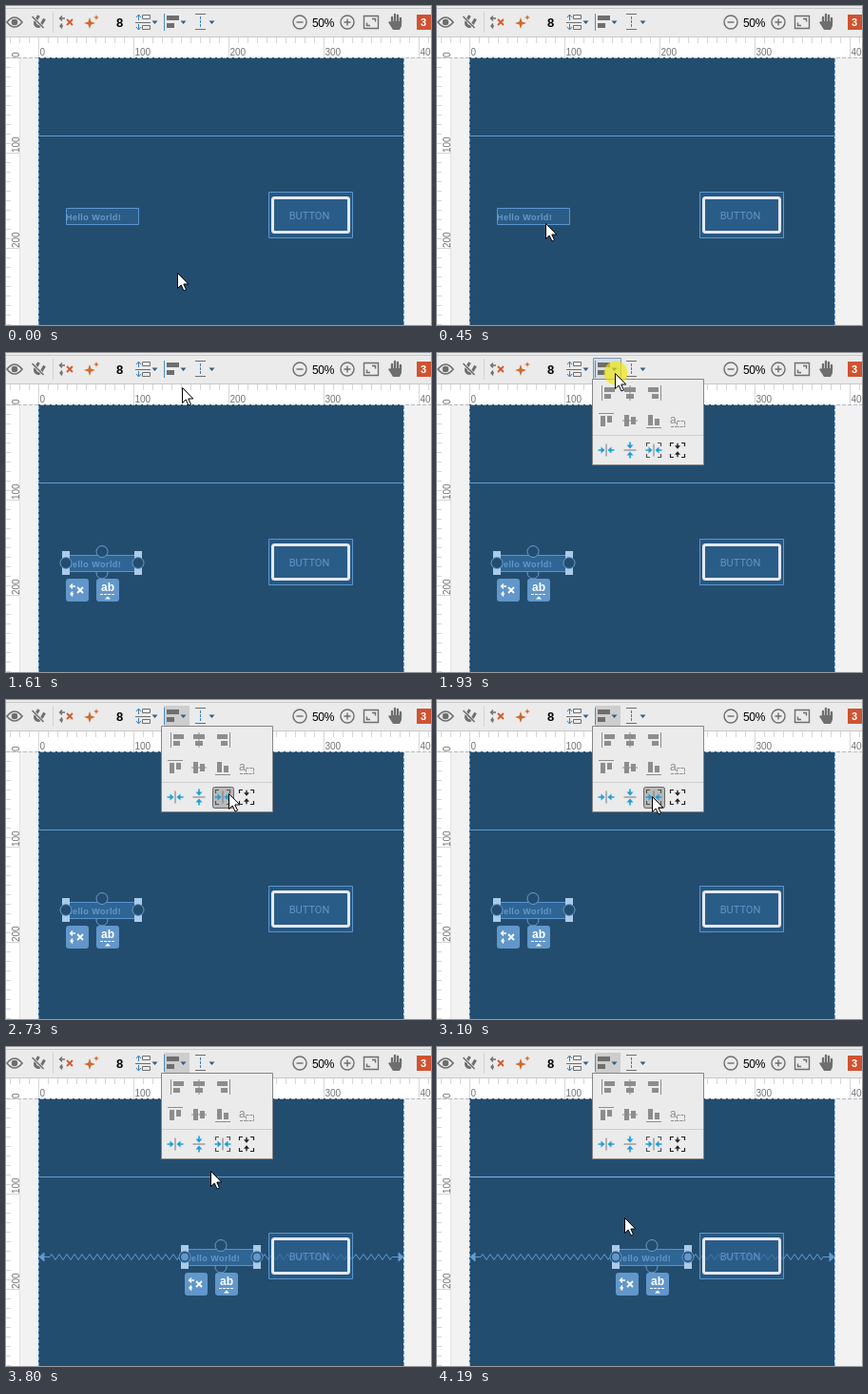
Animation of 447 by 335 pixels, one loop 5820 ms. Source, as an HTML page:

```html
<!DOCTYPE html>
<html lang="en">
<head>
<meta charset="utf-8">
<title>Layout editor</title>
<style>
  html, body { margin: 0; width: 100%; height: 100%; overflow: hidden; background: #f2f2f2; }
  svg { display: block; width: 447px; height: 335px; }
  text { font-family: "Liberation Sans", Arial, sans-serif; }
  .line { fill: none; stroke: #6e6e6e; }
  .blue { fill: none; stroke: #5f9cd3; }
  .ruler text { font-size: 10px; fill: #737373; }
  .node { fill: #2b5c86; stroke: #5a96cc; }
  .node.lit { fill: #2e6594; }
  .handle { fill: #234d6f; stroke: #6a9dcd; }
  .chip { fill: #6197ca; }
  #parent.lit { stroke: #80b6e8; }
</style>
</head>
<body>
<svg viewBox="0 0 447 335">
  <defs>
    <path id="drop" d="M-3-1.5h6l-3 3.5z" fill="#2f5f87"/>
    <path id="side" d="M-8.500-8h1v16h-1zM-5.500-6h11v5h-11zM-5.500 1h7v5h-7z"/>
    <path id="middle" d="M-.5-8h1v16h-1zM-6-6h12v5h-12zM-4 1h8v5h-8z"/>
    <path id="push" d="M-8.500-.8h3v-2.700l4 3.500-4 3.500v-2.700h-3z"/>
    <g id="inward">
      <use href="#push"/><use href="#push" transform="scale(-1 1)"/>
      <path d="M0-6.500V6.500" stroke="#777"/>
    </g>
    <path id="corners" d="M-7.500-4V-7.500H-4M4-7.500H7.500V-4M7.500 4V7.500H4M-4 7.500H-7.500V4" fill="none" stroke-width="1.200"/>
    <path id="unlink" d="M-7-3h5M-5-5.500l-2.500 2.500 2.500 2.500M-4 5h-3M-5 2.500l-2 2.500 2 2.500" fill="none" stroke-width="1.300"/>
    <path id="cross" d="M0-2l6 6M6-2l-6 6" fill="none" stroke-width="1.800"/>
  </defs>

  <!-- canvas and rulers -->
  <path d="M0 33h447v21H0zM0 33h14v302H0z" fill="#fff"/>
  <path d="M14.500 54v281" stroke="#e2e2e2"/>
  <g class="ruler" id="rulers"><path id="ticks" fill="none" stroke="#d6d6d6"/></g>
  <path d="M34 54h384v281H34z" fill="#234d6f"/>
  <path d="M0 54.500h447" stroke="#b0bac3" stroke-dasharray="4 2"/>
  <g id="parent" class="blue">
    <path d="M34.500 55V335M418.500 55V335" stroke-dasharray="4 2"/>
    <path d="M34 136.500H419"/>
  </g>

  <!-- constraints and widgets -->
  <g id="springs" class="blue">
    <path id="zigzag"/>
    <path d="M35 220.500l5-4.500v9zM418 220.500l-5-4.500v9z" fill="#5f9cd3"/>
  </g>
  <path d="M276.500 195.500h88v48h-88z" fill="#2f6594" fill-opacity=".5" stroke="#5a96cc"/>
  <rect x="280.500" y="201.500" width="80" height="36" rx="2" fill="#2f6594" fill-opacity=".35" stroke="#e4e8f5" stroke-width="3"/>
  <text x="319" y="224" text-anchor="middle" style="font:11px Roboto,sans-serif" fill="#6196c7">BUTTON</text>

  <g id="label">
    <circle class="handle picked" cx="101" cy="231" r="6"/>
    <path id="box" class="node" d="M63.500 212.500h76v17h-76z"/>
    <text x="63" y="225" font-size="9" font-weight="bold" letter-spacing=".45" fill="#6399ca">Hello World!</text>
    <g class="picked">
      <path d="M59 208h8v8h-8zM135 208h8v8h-8zM59 225h8v8h-8zM135 225h8v8h-8z" fill="#abcbe8"/>
      <circle class="handle" cx="101" cy="208.500" r="6"/>
      <circle class="handle" cx="63" cy="220.500" r="6"/>
      <circle class="handle" cx="139" cy="220.500" r="6"/>
      <g id="dots" fill="#6197ca"><circle cx="63" cy="220.500" r="4"/><circle cx="139" cy="220.500" r="4"/></g>
      <rect class="chip" x="63" y="237" width="24" height="24" rx="3"/>
      <rect class="chip" x="95" y="237" width="24" height="24" rx="3"/>
      <g stroke="#fff" transform="translate(75 248)"><use href="#unlink"/><use href="#cross"/></g>
      <text x="107" y="250" font-size="12" font-weight="bold" text-anchor="middle" fill="#fff">ab</text>
      <path d="M99 253.500h16" stroke="#fff" stroke-dasharray="3 1"/>
      <path d="M104 258.500h6l-3-3z" fill="#fff"/>
    </g>
  </g>

  <!-- toolbar -->
  <path d="M0 0h447v33H0z" fill="#ebebeb"/>
  <path d="M0 2.500h447M0 32.500h447" stroke="#c8c8c8"/>
  <path d="M49.500 6v22" stroke="#d2d2d2"/>
  <path id="pressed" d="M166 6h27v22h-27z" fill="#cdcdcd"/>
  <path id="hover" d="M164.500 5.500h29v23h-29z" fill="#d3dde6" stroke="#7a98b3"/>
  <g class="line" stroke-width="1.600">
    <path d="M1 17q8-10 16 0q-8 10-16 0z"/><circle cx="9" cy="17" r="2.500" fill="#6e6e6e"/>
    <path d="M-3.500-6V1A3.500 3.500 0 0 0 3.500 1V-6" transform="translate(34.500 17) rotate(30)" stroke-width="3"/>
    <path d="M27.500 11l12 12" stroke="#ebebeb" stroke-width="3"/><path d="M27.500 11l12 12"/>
    <g transform="translate(64 16)" stroke-width="1.300"><use href="#unlink"/><use href="#cross" stroke="#cf5a2b"/></g>
    <g stroke-width="1.400">
      <circle cx="309" cy="17" r="7"/><path d="M305.500 17h7"/>
      <circle cx="359" cy="17" r="7"/><path d="M355.500 17h7M359 13.500v7"/>
      <path d="M376.500 10.500h15v13h-15z"/>
      <path d="M385 13.500h3.500v3M383 20.500h-3.500v-3"/>
    </g>
    <path d="M406 18v-6M409 17v-8M412 17v-7M415 18v-5" stroke-width="2.300" stroke-linecap="round"/>
    <path d="M402 17l2-1 2 2v-2h10v5l-2 4h-7z" fill="#6e6e6e" stroke="none"/>
  </g>
  <path d="M88 12l1.500 4.500 4.500 1.500-4.500 1.500-1.500 4.500-1.500-4.500-4.500-1.500 4.500-1.500zM95 9l.8 2.200 2.200.8-2.200.8-.8 2.200-.8-2.200-2.200-.8 2.200-.8z" fill="#cf6a2b"/>
  <text x="116" y="22" font-size="13" font-weight="bold">8</text>
  <path class="line" d="M143.500 9.500h8v4h-8zM143.500 20.500h8v4h-8zM136 17.500h16"/>
  <path d="M139.500 9v6M137 12l2.500-3 2.500 3M139.500 19v6M137 22l2.500 3 2.500-3" fill="none" stroke="#3b7fb5"/>
  <path d="M166.500 8v18" stroke="#4b8fc6"/>
  <path d="M169 10h13v5h-13zM169 18h8v5h-8z" fill="#6e6e6e"/>
  <path class="line" d="M199 8.500h11M199 24.500h11"/>
  <path d="M204.500 11v11" stroke="#3b7fb5" stroke-dasharray="3 1"/>
  <use href="#drop" x="156.500" y="17"/><use href="#drop" x="186.500" y="17"/><use href="#drop" x="216.500" y="17"/>
  <text x="322" y="22" font-size="12" letter-spacing="-.3">50%</text>
  <path d="M432 9h15v16h-15z" fill="#cf5330"/>
  <text x="436" y="21" font-size="11" font-weight="bold" fill="#fff">3</text>

  <!-- alignment menu -->
  <g id="menu">
    <path d="M163.500 27.500h117v90h-117z" fill="#ebebeb" stroke="#858585"/>
    <path d="M164 86.500h116" stroke="#cfcfcf"/>
    <rect id="item" x="217.500" y="91.500" width="22" height="22" rx="2" fill="#b9b9b9" stroke="#666"/>
    <g fill="#8d8d8d">
      <use href="#side" transform="translate(181.500 42)"/>
      <use href="#middle" transform="translate(203 42)"/>
      <use href="#side" transform="matrix(-1 0 0 1 227.500 42)"/>
      <use href="#side" transform="matrix(0 1 1 0 178 71.500)"/>
      <use href="#middle" transform="matrix(0 1 1 0 203 71)"/>
      <use href="#side" transform="matrix(0 -1 1 0 228 70.500)"/>
      <text x="245" y="74" font-size="12">a</text>
      <path d="M246 77.500h6M252.500 71.500h8v6h-8z" fill="none" stroke="#8d8d8d" stroke-dasharray="3 1"/>
    </g>
    <g fill="#1c9fdc">
      <use href="#inward" transform="translate(178 102)"/>
      <use href="#inward" transform="translate(203 102) rotate(90)"/>
      <use href="#inward" transform="translate(228 102)"/>
      <use href="#corners" transform="translate(228 102)" stroke="#555"/>
      <g transform="translate(253 102)" fill="#222" stroke="#222" stroke-width="0"><use href="#inward" transform="rotate(90) scale(.85)"/><use href="#corners"/></g>
    </g>
  </g>

  <g id="pointer">
    <circle id="click" r="12.500" fill="#f2e600" fill-opacity=".65"/>
    <path d="M-.5.500v16l3.700-3.500 2.800 6 2.500-1.100-2.700-5.900h5z" fill="#fff" stroke="#000"/>
  </g>
</svg>
<script>
const LOOP = 5820;
const $ = id => document.getElementById(id);
const show = (el, on) => { el.style.display = on ? '' : 'none'; };

// Bursts of motion: first step, last step, number of steps.
const bursts = [
  [70, 600, 8], [770, 1310, 8], [1380, 1930, 8], [2030, 2030, 1], [2260, 2790, 8],
  [2870, 2950, 2], [3100, 3100, 1], [3250, 3480, 4], [3650, 4190, 8]
];
const steps = [0, ...bursts.flatMap(([from, to, count]) =>
  Array.from({ length: count }, (_, i) =>
    Math.round((from + (to - from) * i / Math.max(1, count - 1)) / 10) * 10))];

// Pointer tip: time, x, y.
const path = [
  [0, 181, 280], [450, 115, 228], [600, 72, 218], [770, 72, 218], [1080, 178, 139],
  [1310, 184, 58], [1700, 188, 21], [2190, 188, 21], [2710, 235, 98], [2790, 231, 100],
  [2870, 227, 101], [3570, 227, 101], [4190, 198, 179], [LOOP, 198, 179]
];

function pointerAt(t) {
  const i = path.findIndex(p => p[0] > t);
  const [t0, x0, y0] = path[i - 1], [t1, x1, y1] = path[i];
  const k = (t - t0) / (t1 - t0);
  return [Math.round(x0 + (x1 - x0) * k), Math.round(y0 + (y1 - y0) * k)];
}

// Zigzag with straight leads that centre the whole waves.
function spring(from, to) {
  const half = 4, waves = Math.floor((to - from) / (2 * half)) - 1;
  const start = from + Math.floor((to - from - waves * 2 * half) / 2);
  let d = `M${from} 220.500H${start}`;
  for (let i = 0; i < waves * 2; i++) d += `L${start + (i + .5) * half} ${i % 2 ? 223.5 : 217.5}`;
  return d + `L${start + waves * 2 * half} 220.500H${to}`;
}

function drawRulers() {
  let d = '', labels = '';
  for (let v = 0; v <= 410; v += 10) {
    const major = v % 100 === 0;
    d += `M${v + 34.5} 33v${major ? 21 : 6}M0 ${v + 54.5}h${major ? 14 : 5}`;
    if (major) labels += `<text x="${v + 35.5}" y="52">${v}</text>` +
      `<text transform="translate(14 ${v + 54}) rotate(-90)">${v}</text>`;
  }
  for (let x = 24.5; x > 0; x -= 10) d += `M${x} 33v6`;
  $('ticks').setAttribute('d', d);
  $('rulers').insertAdjacentHTML('beforeend', labels);
}

function render(time) {
  const t = steps.filter(s => s <= time).pop();
  const [x, y] = pointerAt(t);
  const within = (from, to) => t >= from && t < to;

  const selected = t >= 850, centred = t >= 3250, open = t >= 1930;
  const k = Math.min(1, (t - 3111) / 369);
  const shift = centred ? Math.round(125 * (1 - Math.cos(Math.PI * k)) / 2) : 0;

  $('pointer').setAttribute('transform', `translate(${x} ${y})`);
  show($('click'), within(770, 850) || within(1930, 2030) || within(2950, 3100));
  show($('hover'), y < 29);
  show($('pressed'), open);
  show($('menu'), open);
  show($('item'), x > 217 && x < 240 && y > 91 && y < 114);

  $('label').setAttribute('transform', `translate(${shift} 0)`);
  $('box').classList.toggle('lit', selected);
  document.querySelectorAll('.picked').forEach(el => show(el, selected));
  show($('dots'), centred);
  show($('springs'), centred);
  if (centred) $('zigzag').setAttribute('d', spring(40, 63 + shift) + spring(139 + shift, 413));
  $('parent').classList.toggle('lit', t >= 920 && y > 136 && (t < 1380 || t > 3650));
}

function frame(now) {
  render(now % LOOP);
  requestAnimationFrame(frame);
}

drawRulers();
render(0);
requestAnimationFrame(frame);
</script>
</body>
</html>
```
